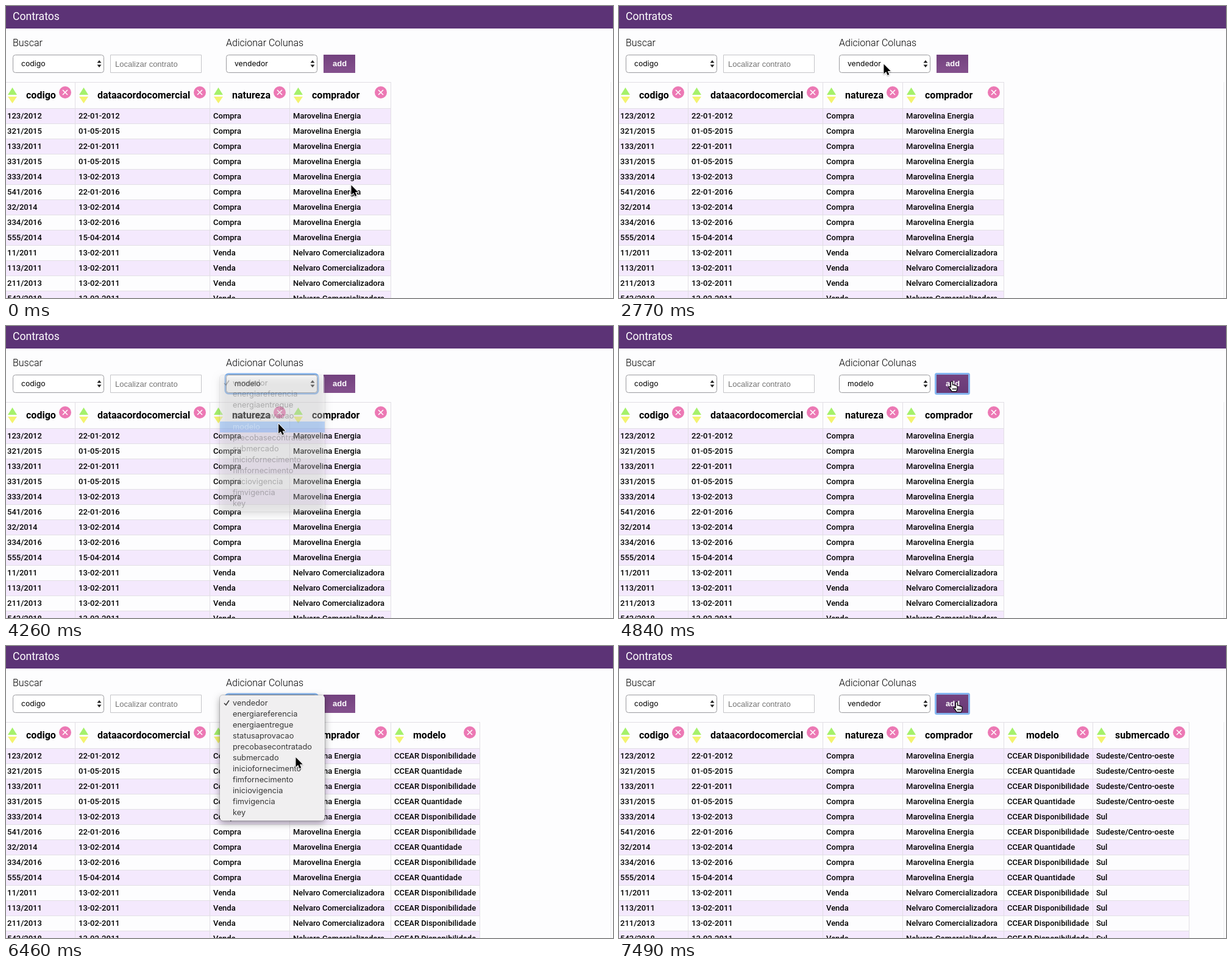
Write an HTML page with a canvas that moves like this. It is 996x480 px and loops after 7.99 s.

```html
<!DOCTYPE html>
<html lang="pt">
<head>
<meta charset="utf-8">
<title>Contratos</title>
<style>
  html, body { margin: 0; width: 996px; height: 480px; overflow: hidden; background: #fdfdfe; }
  canvas { display: block; }
</style>
</head>
<body>
<canvas id="stage" width="996" height="480"></canvas>
<script>
const ctx = document.getElementById('stage').getContext('2d');
const LOOP = 7990;
const ROBOTO = 'Roboto, sans-serif', INTER = 'Inter, sans-serif', ARIAL = '"Liberation Sans", Arial, sans-serif';
const PAGE = '#fdfdfe', RING = '#84b4ee';

const codes = '123/2012 321/2015 133/2011 331/2015 333/2014 541/2016 32/2014 334/2016 555/2014 11/2011 113/2011 211/2013 543/2018'.split(' ');
const dates = '22-01-2012 01-05-2015 22-01-2011 01-05-2015 13-02-2013 22-01-2016 13-02-2014 13-02-2016 15-04-2014'.split(' ');

// Each column: title, left edge, right edge, cell text by row
const columns = [
  ['codigo', -4, 113, i => codes[i]],
  ['dataacordocomercial', 113, 334, i => dates[i] || '13-02-2011'],
  ['natureza', 334, 465, i => i < 9 ? 'Compra' : 'Venda'],
  ['comprador', 465, 631, i => i < 9 ? 'Marovelina Energia' : 'Nelvaro Comercializadora'],
  ['modelo', 631, 777, i => 'CCEAR ' + ([1, 3, 6, 8].includes(i) ? 'Quantidade' : 'Disponibilidade')],
  ['submercado', 777, 935, i => i < 4 || i === 5 ? 'Sudeste/Centro-oeste' : 'Sul'],
];
const options = 'vendedor energiareferencia energiaentregue statusaprovacao modelo precobasecontratado submercado iniciofornecimento fimfornecimento iniciovigencia fimvigencia key'.split(' ');

// The two uses of the drop-down; times in ms
const menus = [
  { open: 2830, pick: 4020, press: 4840, done: 5020, choice: 'modelo', items: options },
  { open: 5500, pick: 6460, press: 7370, done: 7490, choice: 'submercado', items: options.filter(o => o !== 'modelo') },
];

const smooth = p => p * p * (3 - 2 * p);
const easeOut = p => p * (2 - p);
const linear = p => p;

// Pointer moves: start, end, x, y, easing
const moves = [
  [1230, 1240, 566, 295, linear],
  [1360, 2040, 432, 105, smooth],
  [2490, 2770, 434.5, 95.5, smooth],
  [3350, 3840, 444, 163, easeOut],
  [4200, 4780, 546, 91, smooth],
  [5220, 5500, 488, 97, smooth],
  [5800, 6280, 475.5, 183, linear],
  [6580, 7130, 554, 92, smooth],
];

function pointerAt(t) {
  let x = 566.5, y = 294.5;
  for (const [start, end, toX, toY, ease] of moves) {
    if (t < start) break;
    const p = ease(Math.min(1, (t - start) / (end - start)));
    x += (toX - x) * p;
    y += (toY - y) * p;
  }
  return { x, y };
}

function rect(x, y, w, h, color) {
  ctx.fillStyle = color;
  ctx.fillRect(x, y, w, h);
}

function text(str, x, y, font, color = '#000') {
  ctx.font = font;
  ctx.fillStyle = color;
  ctx.fillText(str, x, y);
}

function roundBox(x, y, w, h, r, fill, stroke, lineWidth = 1) {
  ctx.beginPath();
  ctx.roundRect(x, y, w, h, r);
  if (fill) { ctx.fillStyle = fill; ctx.fill(); }
  if (stroke) { ctx.strokeStyle = stroke; ctx.lineWidth = lineWidth; ctx.stroke(); }
}

function triangle(cx, base, tip, halfWidth, color) {
  ctx.fillStyle = color;
  ctx.beginPath();
  ctx.moveTo(cx - halfWidth, base);
  ctx.lineTo(cx + halfWidth, base);
  ctx.lineTo(cx, tip);
  ctx.fill();
}

function select(x, value, focused) {
  if (focused) roundBox(x - 1, 79, 152, 32, 5, null, RING, 3);
  roundBox(x + .5, 80.5, 149, 29, 4, '#fff', '#9b9b9f');
  text(value, x + 14, 99, '12.2px ' + INTER);
  triangle(x + 142, 93.5, 89, 3.5, '#222');
  triangle(x + 142, 96.5, 101, 3.5, '#222');
}

function addButton(focused, hovered) {
  const fill = ctx.createLinearGradient(0, 80, 0, 110);
  fill.addColorStop(0, hovered ? '#74437f' : '#73427e');
  fill.addColorStop(1, hovered ? '#693a77' : '#84508d');
  if (focused) roundBox(519.5, 78.5, 55, 33, 2, '#fff', RING, 3);
  rect(521, 80, 52, 30, fill);
  text('add', 536, 99, 'bold 13px ' + ARIAL, '#fff');
}

function toolbar(value, selectFocus, buttonFocus, hovered) {
  rect(0, 0, 996, 37, '#5c3376');
  text('Contratos', 11, 23, '17.6px ' + ROBOTO, '#fff');
  text('Buscar', 11, 66, '300 16px ' + ROBOTO);
  text('Adicionar Colunas', 361, 66, '300 16px ' + ROBOTO);
  select(11, 'codigo', false);
  roundBox(171.5, 80.5, 149, 29, 0, '#fff', '#c4c4c8');
  text('Localizar contrato', 179, 100, '13px ' + ARIAL, '#757575');
  select(361, value, selectFocus);
  addButton(buttonFocus, hovered);
}

function closeIcon(x, y) {
  roundBox(x - 10, y - 10, 20, 20, 10, '#ec78b4');
  ctx.strokeStyle = '#fff';
  ctx.lineWidth = 1.6;
  ctx.beginPath();
  ctx.moveTo(x - 4, y - 4); ctx.lineTo(x + 4, y + 4);
  ctx.moveTo(x + 4, y - 4); ctx.lineTo(x - 4, y + 4);
  ctx.stroke();
}

function table(count) {
  const shown = columns.slice(0, count), width = shown[count - 1][2] + 1;
  const line = '#e2dfe5';
  rect(992, 125, 1, 355, '#ececf0');
  rect(0, 125, width, 1, line);
  codes.forEach((_, i) => {
    if (i % 2 === 0) rect(0, 168 + 25 * i, width, 25, '#f4e9fd');
    rect(0, 168 + 25 * i, width, 1, line);
  });
  for (const [title, left, right, cell] of shown) {
    rect(right, 125, 1, 355, line);
    triangle(left + 14.5, 146, 134, 7.5, '#a5f16b');
    triangle(left + 14.5, 149, 160, 7.5, '#f3f36f');
    text(title, left + 37, 152, 'bold 16px ' + ROBOTO);
    closeIcon(right - 16, 142);
    codes.forEach((_, i) => text(cell(i), left + 6, 185 + 25 * i, '500 13px ' + ROBOTO));
  }
}

function popup(items, active, alpha) {
  ctx.save();
  ctx.globalAlpha = alpha;
  ctx.shadowColor = 'rgba(0,0,0,.38)';
  ctx.shadowBlur = 12;
  ctx.shadowOffsetY = 4;
  roundBox(351, 81, 172, items.length * 18 + 8, 5, '#f0eff0');
  ctx.shadowColor = 'transparent';
  roundBox(350.5, 80.5, 173, items.length * 18 + 9, 5, null, 'rgba(0,0,0,.16)');
  items.forEach((item, i) => {
    const y = 85 + 18 * i, on = i === active, color = on ? '#fff' : '#383838';
    if (on) rect(351, y, 172, 18, '#4791f8');
    text(item, 372, y + 13, '12.8px ' + INTER, color);
    if (i === 0) {
      ctx.strokeStyle = color;
      ctx.lineWidth = 1.5;
      ctx.beginPath();
      ctx.moveTo(358, 94); ctx.lineTo(361, 97); ctx.lineTo(366, 89.5);
      ctx.stroke();
    }
  });
  ctx.restore();
}

const arrow = new Path2D('M0 0V16L3.7 12.6L6.2 18.2L8.8 17L6.4 11.6H11.3Z');
const hand = new Path2D('M-1.5 1.5Q-1.5 0 0 0Q1.5 0 1.5 1.5V6Q3.5 4.8 4.3 6.6Q6 5.7 6.8 7.4Q9 6.8 9 9V11.5Q9 14 7.5 16.5H0Q-1 14-4 11Q-5.2 9-3.5 8.6Q-2.5 8.6-1.5 10Z');

function pointer(x, y, isHand) {
  ctx.save();
  ctx.translate(x, y);
  ctx.lineJoin = 'round';
  ctx.shadowColor = 'rgba(0,0,0,.3)';
  ctx.shadowBlur = 2;
  ctx.shadowOffsetY = 1;
  if (isHand) {
    ctx.fillStyle = '#fff';
    ctx.fill(hand);
    ctx.shadowColor = 'transparent';
    ctx.strokeStyle = '#000';
    ctx.lineWidth = 1.2;
    ctx.stroke(hand);
    ctx.stroke(new Path2D('M2 11V14M4.3 11V14M6.5 11V14'));
  } else {
    ctx.strokeStyle = '#fff';
    ctx.lineWidth = 2;
    ctx.stroke(arrow);
    ctx.shadowColor = 'transparent';
    ctx.fillStyle = '#000';
    ctx.fill(arrow);
  }
  ctx.restore();
}

function draw(t) {
  const { x, y } = pointerAt(t);
  const overButton = x > 520 && x < 573 && y > 80 && y < 110;
  const current = menus.find(m => t >= m.open && t < m.done);
  const value = current && t >= current.pick + 60 ? current.choice : 'vendedor';
  const selectFocus = menus.some(m => t >= m.open && t < m.press);
  const buttonFocus = t >= 4840 && t < 5500 || t >= 7370;

  rect(0, 0, 996, 480, PAGE);
  toolbar(value, selectFocus, buttonFocus, overButton);
  table(4 + menus.filter(m => t >= m.done).length);

  if (current && t < current.pick + 300) {
    const sincePick = t - current.pick;
    const blink = sincePick >= 0 && sincePick < 60;
    // The highlight trails the pointer; once picked it stays on the choice
    const row = sincePick < 0
      ? Math.max(0, Math.floor((pointerAt(t - 60).y - 85) / 18))
      : current.items.indexOf(current.choice);
    popup(current.items, blink ? -1 : row, Math.min(1, 1 - (sincePick - 120) / 180));
  }
  pointer(x, y, overButton);
}

function frame() {
  draw(performance.now() % LOOP);
  requestAnimationFrame(frame);
}
frame();
</script>
</body>
</html>
```
